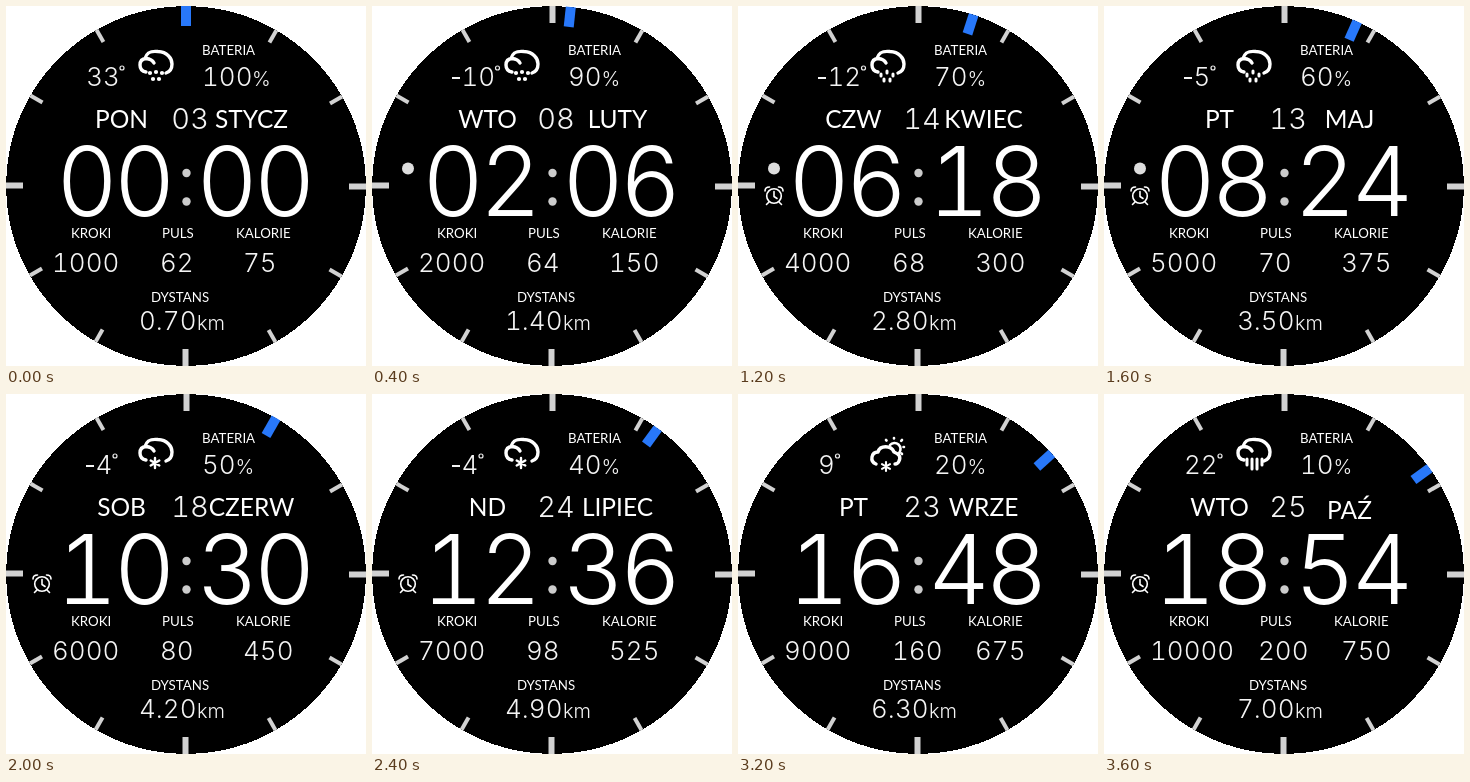
Write an HTML page that moves like this. It is 360 px wide and 360 px high and loops after 4 s.

```html
<!DOCTYPE html>
<html lang="pl">
<head>
<meta charset="utf-8">
<title>Tarcza zegarka</title>
<style>
  html, body { margin: 0; width: 100%; height: 100%; overflow: hidden; background: #fff; }
  svg { display: block; width: 100vw; height: 100vh; }
  text { fill: #fff; }
  .label { font: 13.3px Lato, sans-serif; }
  .word { font: 24.5px Lato, sans-serif; text-anchor: middle; }
  .num { font: 300 26px Inter, sans-serif; font-feature-settings: "tnum"; fill: #f4f4f4; }
  .day { font-size: 29px; text-anchor: middle; }
  .unit { font-size: 20px; }
  .clock { font-size: 96px; text-anchor: middle; fill: #fff; }
  .line { fill: none; stroke: #fff; stroke-width: 3.4; stroke-linecap: round; stroke-linejoin: round; }
</style>
</head>
<body>
<svg id="face" viewBox="0 0 360 360">
  <circle cx="180" cy="180" r="180" shape-rendering="crispEdges"/>
</svg>
<script>
const STEP = 400, COUNT = 10;
const face = document.getElementById('face');

function add(tag, attrs, content = '', parent = face) {
  const node = document.createElementNS('http://www.w3.org/2000/svg', tag);
  for (const key in attrs) node.setAttribute(key, attrs[key]);
  node.textContent = content;
  parent.append(node);
  return node;
}
const text = (x, y, cls, content) => add('text', { x, y, class: cls }, content);
const line = (d, parent, width = 3.4) =>
  add('path', { d, class: 'line', style: `stroke-width:${width}` }, '', parent);
const spin = (node, angle) => node.setAttribute('transform', `rotate(${angle} 180 180)`);
const show = (node, on) => node.setAttribute('visibility', on ? 'visible' : 'hidden');

for (let i = 0; i < 12; i++) {
  const major = i % 3 === 0;
  const width = major ? 6 : 4;
  const tick = add('rect', {
    x: 180.5 - width / 2, y: 0, width, height: major ? 17 : 14, fill: '#d2d2d2'
  });
  spin(tick, i * 30);
}
const marker = add('rect', { x: 175, y: 0, width: 10, height: 20, fill: '#2878fa' });

[['BATERIA', 196, 49], ['KROKI', 65, 232], ['PULS', 156, 232],
 ['KALORIE', 230, 232], ['DYSTANS', 145, 296]]
  .forEach(([name, x, y]) => text(x, y, 'label', name));
text(191, 324, 'num unit', 'km');

const fields = {
  temp: text(80, 80, 'num'),
  battery: text(196, 80, 'num'),
  weekday: text(115.5, 122, 'word'),
  day: text(184, 123, 'num day'),
  month: text(245.5, 122, 'word'),
  steps: text(46, 266, 'num'),
  pulse: text(154, 266, 'num'),
  calories: text(237, 266, 'num'),
  distance: text(133, 324, 'num')
};
const percent = text(0, 80, 'num unit', '%');
const degree = add('circle', { cy: 62, r: 2, fill: 'none', stroke: '#eee', 'stroke-width': 1.2 });
const digits = [81, 138.5, 221, 278.5].map(x => text(x, 210, 'num clock'));
for (const cy of [167, 195.5]) add('circle', { cx: 180.5, cy, r: 4.2, fill: '#ccc' });

// Status icons
const link = add('circle', { cx: 36, cy: 162.5, r: 6, fill: '#ddd' });
const alarm = add('g', {});
add('circle', { cx: 36, cy: 190, r: 7.3, class: 'line', style: 'stroke-width:1.6' }, '', alarm);
line('M36 185.5V190.5L39 192.5M27 185Q27 181 31.5 181M45 185Q45 181 40.5 181M31 196L28.5 198.5M41 196L43.5 198.5', alarm, 1.6);

// Weather icons
const cloud = 'M140 66Q134 65 134 59Q134 53 140 52.5Q146 53 148 57M139 52.5C141 45 147 45 152 45.5C161 46 166 52 166 58Q166 65 160 67';
const dots = 'M144 67h.01M150 66h.01M156 67h.01M147 73h.01M153 73h.01';
const drops = 'M143 68v2M149 65v2M155 68v2M146 73v2M152 73v2';
const rain = 'M143 65v6M148 65v10M153 65v10M158 65v6';
const star = 'M149 64v10M144.7 66.5l8.6 5M153.3 66.5l-8.6 5';
const wind = 'M133 57H149Q155 56 153 50Q150 45 146 49M133 62H160Q167 60 165 54Q162 50 158 54M137 52H145M133 67H152Q157 70 154 75Q150 78 147 74M157 67H163';
const smallCloud = 'M138 70Q133 68 134 63Q135 58 140 58C142 51 153 51 156 58Q164 61 161 67Q160 70 157 70';
const sun = 'M152 51A6 6 0 1 1 161 59M156 44v.5M148 46l.5 .5M164 46l-.8 .8M166 53h-.5M164 60l-.5 -.5';

function icon(...strokes) {
  const group = add('g', {});
  strokes.forEach(([d, width]) => line(d, group, width));
  return group;
}
const icons = {
  hail: icon([cloud, 3.4], [dots, 4.2]),
  drizzle: icon([cloud, 3.4], [drops, 3]),
  rain: icon([cloud, 3.4], [rain, 3]),
  snow: icon([cloud, 3.4], [star, 2.4]),
  wind: icon([wind, 3.2]),
  mixed: icon([smallCloud, 3.4], [sun, 2.6], ['M148 68v9M144 70.2l8 4.6M152 70.2l-8 4.6', 2.1])
};

// weekday, day, month, temperature, pulse, weather
const days = [
  ['PON', '03', 'STYCZ', '33', 62, 'hail'],
  ['WTO', '08', 'LUTY', '-10', 64, 'hail'],
  ['ŚRO', '16', 'MAR', '-20', 66, 'hail'],
  ['CZW', '14', 'KWIEC', '-12', 68, 'drizzle'],
  ['PT', '13', 'MAJ', '-5', 70, 'drizzle'],
  ['SOB', '18', 'CZERW', '-4', 80, 'snow'],
  ['ND', '24', 'LIPIEC', '-4', 98, 'snow'],
  ['CZW', '25', 'SIERP', '0', 120, 'wind'],
  ['PT', '23', 'WRZE', '9', 160, 'mixed'],
  ['WTO', '25', 'PAŹ', '22', 200, 'rain']
];
const pad = n => String(n).padStart(2, '0');

function render(i) {
  const [weekday, day, month, temp, pulse, weather] = days[i];
  const battery = String(100 - 10 * i);
  const values = {
    weekday, day, month, pulse, battery,
    temp: temp.replace('-', ''),
    steps: 1000 * (i + 1),
    calories: 75 * (i + 1),
    distance: (0.7 * (i + 1)).toFixed(2)
  };
  for (const key in values) fields[key].textContent = values[key];

  const minus = temp.startsWith('-');
  fields.temp.setAttribute('x', minus ? 89.5 : 80);
  show(dash, minus);
  degree.setAttribute('cx', (minus ? 92.5 : 83) + 16.5 * values.temp.length);
  percent.setAttribute('x', 196.5 + 16.5 * battery.length);
  fields.month.setAttribute('y', month === 'SIERP' || month === 'PAŹ' ? 124.5 : 122);

  [...pad(2 * i) + pad(6 * i)].forEach((digit, n) => digits[n].textContent = digit);
  spin(marker, 6 * i);
  for (const key in icons) show(icons[key], key === weather);
  show(link, i >= 1 && i <= 4);
  show(alarm, (i >= 3 && i <= 6) || i === 9);
}
const dash = add('rect', { x: 80, y: 71, width: 8, height: 2, fill: '#f4f4f4' });

let current = -1;
function tick() {
  const i = Math.floor(performance.now() / STEP) % COUNT;
  if (i !== current) render(current = i);
  requestAnimationFrame(tick);
}
tick();
</script>
</body>
</html>
```
